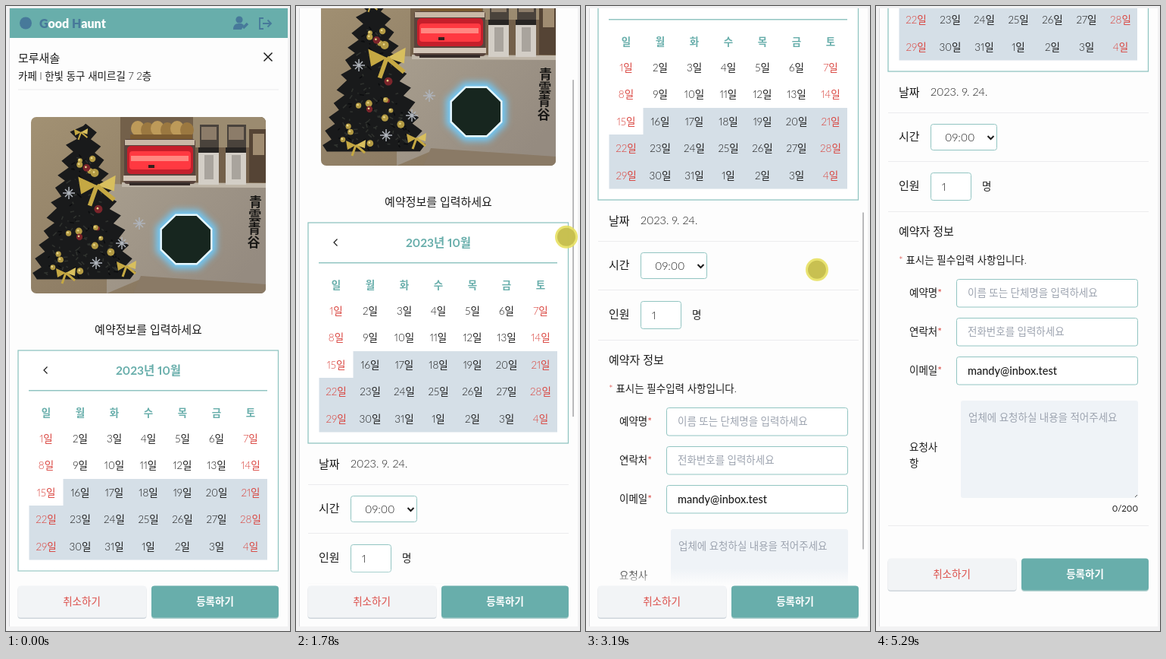
An HTML page that plays this animation: 375 px wide and 822 px high, repeating every 6.02 s.

```html
<!DOCTYPE html>
<html lang="ko">
<head>
<meta charset="utf-8">
<title>예약</title>
<style>
  html, body { margin: 0; width: 100%; height: 100%; overflow: hidden; background: #f2f2f3; }
  svg { display: block; }
  text { font-family: Lato, "Noto Sans CJK KR", "Noto Sans CJK", sans-serif; font-feature-settings: "pnum"; white-space: pre; }
</style>
</head>
<body>
<svg id="stage" width="375" height="822" viewBox="0 0 375 822"></svg>
<script>
const TEAL = '#68aeab', LINE = '#92c5c2', BLUE = '#47799a', RED = '#d9423c', INK = '#1c1c1c';
const LOOP = 6020, BAR_Y = 1383, STICKY_Y = 762;

// cy is the optical middle of the line
const text = (x, cy, s, size = 13.5, fill = INK, weight = 400, anchor = 'start') =>
  `<text x="${x}" y="${cy + size * 0.37}" font-size="${size}" fill="${fill}" font-weight="${weight}" text-anchor="${anchor}">${s}</text>`;
const mid = (x, cy, s, size, fill, weight) => text(x, cy, s, size, fill, weight, 'middle');
const rect = (x, y, w, h, fill, more = '') =>
  `<rect x="${x}" y="${y}" width="${w}" height="${h}" fill="${fill}" ${more}/>`;
const path = (d, stroke, width = 1, more = '') =>
  `<path d="${d}" fill="none" stroke="${stroke}" stroke-width="${width}" ${more}/>`;
const circle = (x, y, r, fill, more = '') => `<circle cx="${x}" cy="${y}" r="${r}" fill="${fill}" ${more}/>`;
const poly = (points, fill, more = '') => `<polygon points="${points}" fill="${fill}" ${more}/>`;
const rule = y => rect(16, y, 344, 1, '#ececee');
const field = (x, y, w, h) => rect(x + .5, y + .5, w - 1, h - 1, '#fff', `rx="3" stroke="${LINE}"`);

let seed = 7;
const rnd = () => (seed = seed * 16807 % 2147483647) / 2147483647;

function header() {
  return rect(5, 3, 367, 39, TEAL) + circle(26, 22.5, 8, BLUE) +
    text(44, 23, `<tspan fill="${BLUE}">G</tspan>ood <tspan fill="${BLUE}">H</tspan>aunt`, 16, '#fff', 900) +
    circle(308, 18, 4.6, BLUE) +
    `<path d="M300 31q0-8 7-8h4l3 2-3 6z" fill="${BLUE}"/>` +
    path('M313 29l6-6', BLUE, 3.4) +
    path('M340 16h-5v14h5M339 23h10M345.500 18.500l4.500 4.500-4.500 4.500', BLUE, 1.8);
}

function tree() {
  let left = [], right = [];
  for (let i = 0; i <= 22; i++) {
    const y = 8 + i * 9.3, w = 4 + i * 2.6, out = i % 2 ? 9 : -3;
    left.unshift([70 - w - out - rnd() * 4, y + rnd() * 4]);
    right.push([70 + w + out + rnd() * 4, y + rnd() * 4]);
  }
  let s = poly(right.concat(left).join(' '), '#191a1b');
  for (let i = 0; i < 130; i++) {
    const k = Math.sqrt(rnd()), x = 70 + (rnd() - .5) * 110 * k, y = 14 + k * 195;
    s += path(`M${x} ${y}l${rnd() * 12 - 6} ${rnd() * 6 - 1}`, i % 3 ? '#30332f' : '#0b0c0e', 1.5);
  }
  for (let i = 0; i < 20; i++) {
    const k = .2 + .8 * rnd(), x = 70 + (rnd() - .5) * 100 * k, y = 10 + k * 195;
    s += circle(x, y, 3 + rnd() * 2.5, i % 6 ? '#b39a43' : '#7c252b') + circle(x - 1, y - 1, 1.3, '#ead98c');
  }
  for (const [x, y, k] of [[87, 90, 1.9], [46, 205, 1], [126, 196, 1], [66, 20, .7]])
    s += `<g transform="translate(${x} ${y}) scale(${k})">` +
      poly('0,0 -13,-6 -11,6', '#c5a843') + poly('0,0 13,-7 12,4', '#d8bf5e') +
      path('M0 0L-5 14M0 0L12 10', '#c5a843', 3) + '</g>';
  for (const [x, y] of [[86, 192], [120, 166], [50, 100], [143, 140]])
    s += path(`M${x - 8} ${y}h16M${x} ${y - 8}v16M${x - 5} ${y - 5}l10 10M${x + 5} ${y - 5}l-10 10`, '#aeb3ba', 1.5);
  return s;
}

function photo() {
  const octagon = Array.from({ length: 8 }, (_, i) => {
    const a = (i + .5) * Math.PI / 4;
    return [205 + 36 * Math.cos(a), 161 + 35 * Math.sin(a)].map(v => v.toFixed(1));
  }).join(' ');
  let s = rect(0, 0, 310, 232, 'url(#wall)') + rect(118, 0, 192, 92, '#73604a') +
    rect(214, 0, 96, 40, '#9b8b70') +
    poly('100,88 310,91 310,221 150,211 100,232', 'url(#counter)') +
    poly('145,209 310,220 310,232 135,232', '#8a7a66') +
    poly('120,86 310,87 310,93 120,92', '#c0b7a9');
  for (let i = 0; i < 6; i++)
    s += `<ellipse cx="${141 + i * 13}" cy="${15 + i % 2 * 2}" rx="9" ry="10" fill="${i % 2 ? '#9b7840' : '#bd9a59'}"/>`;
  s += rect(131, 23, 82, 6, '#7a5a30') + rect(123, 29, 94, 59, '#59453d', 'rx="4"') +
    rect(124, 30, 92, 7, '#c9b9a7') + rect(127, 38, 87, 37, '#c51f2b', 'rx="5"') +
    rect(130, 45, 81, 24, '#ff3941', 'rx="4"') + rect(132, 51, 76, 7, '#ff8781') +
    rect(155, 63, 8, 4, '#36201c') + rect(122, 77, 96, 7, '#d3c6b8') + rect(130, 86, 80, 4, '#352b28');
  for (const x of [221, 257])
    s += rect(x + 2, 10, 25, 34, '#4a433c') + rect(x + 4, 13, 20, 17, '#8c7c69') +
      rect(x, 40, 27, 8, '#272523') + rect(x, 47, 27, 42, '#d3cec6') + rect(x + 8, 50, 12, 32, '#a9a49d');
  s += rect(288, 16, 22, 70, '#554435') + rect(293, 22, 15, 28, '#a08c71');
  s += poly(octagon, '#71c9f6', 'stroke="#6fc8f6" stroke-width="13" filter="url(#glow)"') +
    poly(octagon, '#17261f', 'stroke="#e6f7ff" stroke-width="2.500"');
  [...'青雲青谷'].forEach((c, i) => s += mid(296.5 - i * .8, 112 + i * 17.5, c, 17, '#171614', 700));
  s += tree();
  return `<g transform="translate(33 146)" clip-path="url(#photoClip)">${s}</g>`;
}

function calendar() {
  let s = rect(16, 453, 343.5, 290, '#fff', `stroke="${LINE}" stroke-width="1.300"`) +
    path('M54.500 474.500l-4.500 4.500 4.500 4.500', INK, 1.2) +
    mid(188, 479, '2023년 10월', 15.5, TEAL, 700) + rect(30, 505, 315, 1.5, LINE) +
    rect(75.5, 622, 269.5, 36, '#d5dfe7') + rect(30.5, 657, 314.5, 71.5, '#d5dfe7');
  [...'일월화수목금토'].forEach((d, i) => s += mid(53 + i * 45, 535, d, 13.5, TEAL, 700));
  for (let i = 0; i < 35; i++) {
    const col = i % 7, row = (i - col) / 7;
    s += mid(53 + col * 45, 569 + row * 35.5, `${i % 31 + 1}일`, 13.5, col % 6 ? INK : RED, 300);
  }
  return s;
}

function form() {
  const hint = '#9ca3af', star = `<tspan fill="${RED}">*</tspan>`;
  let s = text(30, 770, '날짜', 15) + text(72, 770, '2023. 9. 24.', 14.5, INK, 300) + rule(797) +
    text(30, 828, '시간', 15) + field(72, 812, 88, 35) + text(91, 829.5, '09:00', 14.5, INK, 300) +
    path('M147.500 828l4 4 4-4', INK, 2) + rule(861) +
    text(30, 893, '인원', 15) + field(72, 876, 54, 37) + text(87, 894.5, '1', 14, INK, 300) +
    text(140, 894, '명') + rule(927) +
    text(30, 953, '예약자 정보', 15) + text(30, 991, star + ' 표시는 필수입력 사항입니다.', 13.5, INK, 300);
  const rows = [['예약명', '이름 또는 단체명을 입력하세요', hint], ['연락처', '전화번호를 입력하세요', hint],
    ['이메일', 'mandy@inbox.test', INK]];
  rows.forEach(([label, value, fill], i) => {
    const y = 1016 + i * 51;
    s += text(44, y + 18.5, label + star) + field(106, y, 240, 37.5) +
      text(121, y + 18.5, value, fill === INK ? 14.5 : 13.5, fill, 500);
  });
  return s + rect(112, 1176, 234, 128, '#eff3f7', 'rx="3"') +
    text(122, 1198, '업체에 요청하실 내용을 적어주세요', 13.5, hint, 500) +
    path('M342 1303l3-3', '#555') +
    text(44, 1237, '요청사') + text(44, 1258, '항') +
    text(346, 1318, '0/200', 11.5, INK, 400, 'end') + rule(1340);
}

function buttons() {
  return rect(5, -22, 367, 22.5, 'url(#fade)') + rect(5, 0, 367, 100, '#fdfdfd') +
    rect(15.5, 2, 170, 42, '#cfd6dc', 'rx="4"') + rect(15.5, .5, 170, 42, '#f2f4f6', 'rx="4"') +
    rect(192, 2, 168, 42, '#b4d2d0', 'rx="4"') + rect(192, .5, 168, 42, TEAL, 'rx="4"') +
    mid(100, 21.5, '취소하기', 13.5, '#dc4f4a', 500) + mid(276, 21.5, '등록하기', 13.5, '#fff', 700);
}

const stop = (o, c, a = 1) => `<stop offset="${o}" stop-color="${c}" stop-opacity="${a}"/>`;
const stage = document.getElementById('stage');
stage.innerHTML = `<defs>
  <clipPath id="view">${rect(5, 3, 367, 813, '#000')}</clipPath>
  <clipPath id="photoClip">${rect(0, 0, 310, 232, '#000', 'rx="7"')}</clipPath>
  <linearGradient id="fade" x2="0" y2="1">${stop(0, '#fdfdfd', 0) + stop(1, '#fdfdfd')}</linearGradient>
  <linearGradient id="wall" x2="1" y2="1">${stop(0, '#a29173') + stop(1, '#81705b')}</linearGradient>
  <linearGradient id="counter" x2="1" y2=".6">${stop(0, '#a79d8d') + stop(1, '#958b80')}</linearGradient>
  <filter id="glow" x="-40%" y="-40%" width="180%" height="180%"><feGaussianBlur stdDeviation="4"/></filter>
</defs>
${rect(0, 0, 375, 822, '#f2f2f3') + rect(4, 3, 1, 813, '#d9dadc') + rect(5, 3, 367, 813, '#fdfdfd')}
<g clip-path="url(#view)">
  <g id="page">${header() + text(16, 68, '모루새솔', 15) +
    text(16, 92, '카페 l 한빛 동구 새미르길 7 2층', 13.5, INK, 300) +
    path('M340.500 61.500l11 11m0-11l-11 11', INK, 1.5) + rule(109.5) + photo() +
    mid(188, 425, '예약정보를 입력하세요', 15) + calendar() + form()}</g>
  <g id="buttons">${buttons()}</g>
  ${rect(365, 0, 2, 443, '#b9b9bb', 'id="thumb"')}
</g>
<g id="touch">${circle(0, 0, 15, '#e6df5c', 'opacity=".88"') + circle(0, 0, 12, '#c4bd4e', 'opacity=".92"')}</g>`;

// [ms, scroll]
const scrollKeys = [[0, 0], [940, 0], [1140, 29], [1780, 168], [2100, 229], [2850, 229],
  [3190, 488], [3400, 515], [3700, 523], [4150, 523], [4670, 657]];
// [ms, x, y]
const touchKeys = [[0, 395, 870], [69, 395, 870], [70, 362, 788], [340, 320, 454], [720, 320, 454], [870, 335, 484],
  [940, 335, 480], [1140, 332, 438], [1780, 357, 304], [2100, 359, 243], [2300, 345, 320], [2650, 311, 580],
  [2850, 309, 621], [3190, 305, 347], [3400, 304, 320], [3600, 304, 335], [4070, 307, 614], [4150, 307, 640],
  [4670, 305, 491], [4800, 306, 491], [5270, 362, 840], [5290, 395, 870]];

function at(keys, t) {
  const i = keys.findIndex(k => k[0] > t);
  if (i < 0) return keys[keys.length - 1].slice(1);
  const a = keys[i - 1], b = keys[i], k = (t - a[0]) / (b[0] - a[0]);
  return a.slice(1).map((v, j) => v + (b[j + 1] - v) * k);
}

const get = id => document.getElementById(id);
const page = get('page'), bar = get('buttons'), thumb = get('thumb'), touch = get('touch');
const move = (el, x, y) => el.setAttribute('transform', `translate(${x} ${y})`);

function draw(t) {
  const [scroll] = at(scrollKeys, t), [x, y] = at(touchKeys, t);
  move(page, 0, -Math.round(scroll));
  move(bar, 0, Math.min(STICKY_Y, BAR_Y - Math.round(scroll)));
  move(thumb, 0, 5.5 + scroll * .545);
  thumb.setAttribute('opacity', t < 1000 ? 0 : Math.max(0, Math.min(1, (5280 - t) / 300)));
  move(touch, x, y);
}

const start = performance.now();
function tick() {
  draw((performance.now() - start) % LOOP);
  requestAnimationFrame(tick);
}
tick();
</script>
</body>
</html>
```
